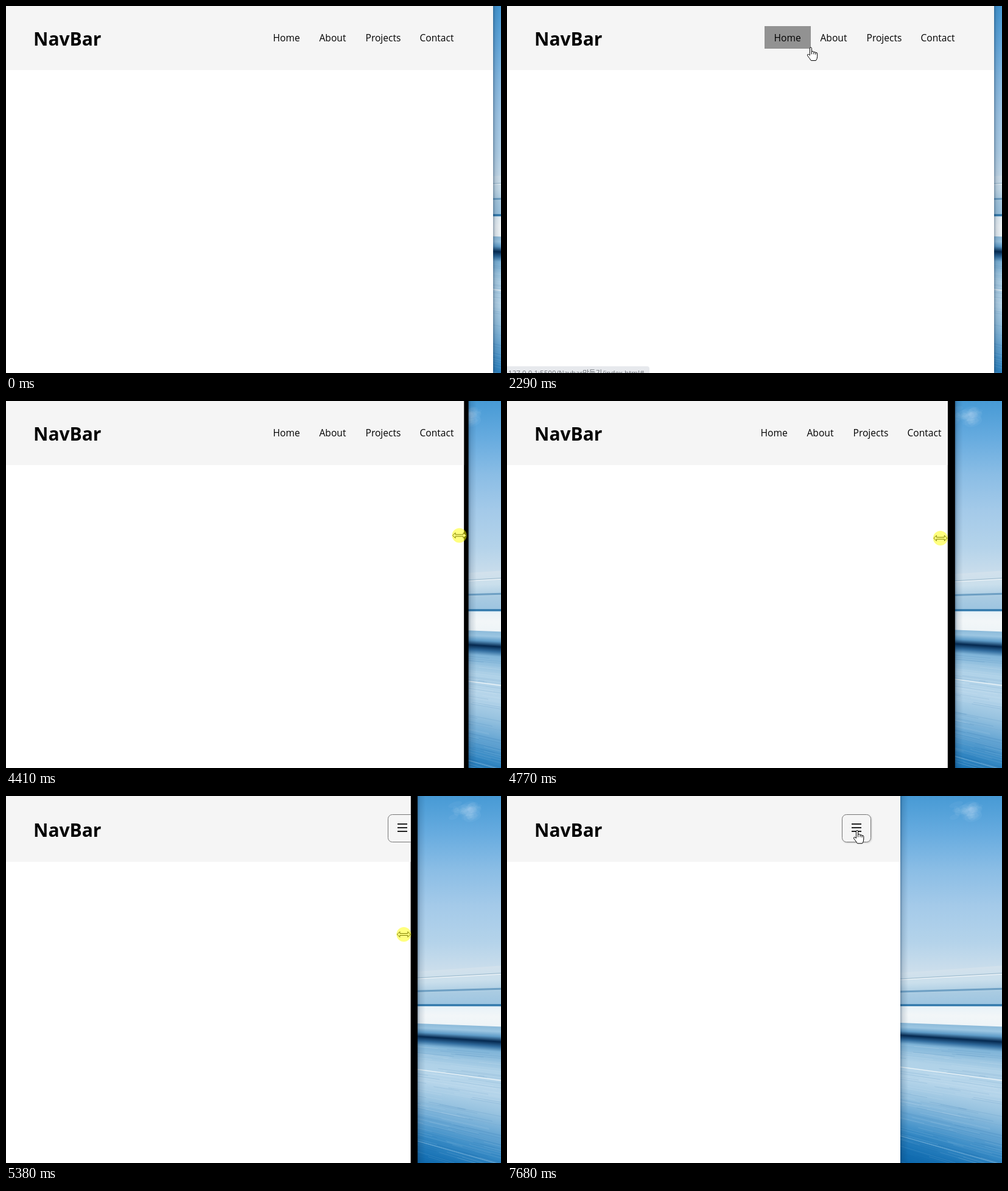
These frames come from a looping animation (813x602 px, 8 s). An HTML page with a canvas:

```html
<!DOCTYPE html>
<html lang="en">
<head>
<meta charset="utf-8">
<title>NavBar</title>
<style>
  html, body { margin: 0; width: 100%; height: 100%; overflow: hidden; background: #fff; }
  canvas, svg { position: absolute; left: 0; top: 0; display: block; }
  text { font-family: "Open Sans", "Noto Sans", "Noto Sans CJK KR", sans-serif; }
</style>
</head>
<body>
<canvas id="desk" width="813" height="602"></canvas>
<svg width="813" height="602" viewBox="0 0 813 602">
  <defs>
    <linearGradient id="shade">
      <stop offset="0" stop-color="#0a2a4a" stop-opacity=".4"/>
      <stop offset=".3" stop-color="#0a2a4a" stop-opacity=".14"/>
      <stop offset="1" stop-color="#0a2a4a" stop-opacity="0"/>
    </linearGradient>
    <clipPath id="clip"><rect id="view" height="602"/></clipPath>
    <filter id="drop" x="-20%" y="-20%" width="150%" height="150%">
      <feDropShadow dx="1" dy="1" stdDeviation="1" flood-opacity=".2"/>
    </filter>
  </defs>
  <rect id="shadow" width="13" height="602" fill="url(#shade)"/>
  <rect id="frame" height="602"/>
  <g clip-path="url(#clip)">
    <rect width="813" height="602" fill="#fff"/>
    <rect id="header" width="813" fill="#f5f5f5"/>
    <text id="logo" x="45" font-size="30" font-weight="700">NavBar</text>
    <g id="nav" font-size="15.6"></g>
    <g id="menu">
      <rect id="button" x=".5" y="30.5" width="47" height="45" rx="7" fill="#f5f5f5" stroke="#777"/>
      <path d="M16 46h16M16 52h16M16 58h16" stroke="#222" stroke-width="1.8"/>
    </g>
    <g id="status">
      <path d="M0 591H230Q234 591 234 595V602H0Z" fill="#e7e9ed"/>
      <text x="2" y="606" font-size="11.6" fill="#6b6f75">127.0.0.1:5500/Navbar만들기/index.html#</text>
    </g>
  </g>
  <g id="cursor" fill="#fff" stroke="#000" stroke-linejoin="round">
    <path id="arrow" d="M.5 .5V16L4 12.7 6.5 18.5 9 17.4 6.6 11.8H11.5Z"/>
    <path id="hand" d="M-1.5 13V1.8Q-1.5 .3 0 .3T1.5 1.8V7Q4.5 5.5 5 8 8 7 8 9 10.8 8 10.8 10.5V15Q10.8 19 8.5 21.8H.5Q-2 18 -5.2 14 -6.2 11.5 -4.3 11.5 -3 11.5 -1.5 13.5M1.5 7V11.5M5 8V11.5M8 9V12"/>
    <path id="resize" d="M-11 0L-6.5-4.5V-1.5H6.5V-4.5L11 0 6.5 4.5V1.5H-6.5V4.5Z"/>
    <circle id="press" r="12" fill="#ff0" fill-opacity=".5" stroke="none"/>
  </g>
</svg>
<script>
const $ = id => document.getElementById(id);
const set = (id, attrs) => { for (const k in attrs) $(id).setAttribute(k, attrs[k]); };
const show = (id, on) => set(id, { visibility: on ? 'visible' : 'hidden' });

const LOOP = 8000, LEFT = 646, RIGHT = 813, BOTTOM = 602, HORIZON = 343;

// Cursor hot spot: time, x, y
const path = [
  [330, 797, 478], [1150, 730, 70.5], [1950, 520, 64], [2020, 496, 65], [2290, 498.5, 67.5],
  [3090, 801, 214], [3450, 801, 214], [3460, 800, 221], [3790, 800, 221], [3800, 800, 213],
  [4770, 712, 225], [5050, 660, 227], [5700, 647, 227], [6130, 647, 227],
  [6200, 666, 233], [6350, 678, 245], [6870, 574, 58], [7200, 574, 58],
  [7340, 562, 44], [7480, 573, 61], [7680, 575, 56]
];
// Window edge: time, x
const drag = [[3800, 800], [4770, 736], [5050, 707], [5700, LEFT]];

// Links sit side by side, each padded around its word
let next = 423;
const links = [['Home', 76], ['About', 76], ['Projects', 89], ['Contact', 88]]
  .map(([name, w]) => ({ name, w, x: (next += w) - w }));

function at(keys, t) {
  const i = keys.findIndex(k => k[0] > t);
  if (i === 0) return keys[0].slice(1);
  if (i < 0) return keys[keys.length - 1].slice(1);
  const a = keys[i - 1], b = keys[i], p = (t - a[0]) / (b[0] - a[0]);
  return a.slice(1).map((v, j) => v + (b[j + 1] - v) * p);
}
const ramp = (t, from, to) => Math.max(0, Math.min(1, (t - from) / (to - from)));

function paintDesk() {
  const c = $('desk').getContext('2d');
  let seed = 7;
  const rnd = () => (seed = seed * 16807 % 2147483647) / 2147483647;
  // Everything spreads from the horizon towards the right
  const fan = (y, x) => HORIZON + (y - HORIZON) * (1 + .22 * (x - LEFT) / (RIGHT - LEFT));
  const blend = (y0, y1, colors) => {
    const g = c.createLinearGradient(0, y0, 0, y1);
    colors.split(' ').forEach((col, i, all) => g.addColorStop(i / (all.length - 1), '#' + col));
    return g;
  };
  const layer = (y0, y1, colors) => {
    for (let x = LEFT; x < RIGHT; x++) {
      const top = fan(y0, x);
      c.fillStyle = blend(top, fan(y1, x), colors);
      c.fillRect(x, top, 1, BOTTOM - top);
    }
  };
  const streak = (y, color, width = 1, x0 = LEFT, x1 = RIGHT) => {
    c.strokeStyle = color;
    c.lineWidth = width;
    c.beginPath();
    c.moveTo(x0, fan(y, x0));
    c.lineTo(x1, fan(y, x1));
    c.stroke();
  };

  c.fillStyle = blend(0, 300, '479ad5 66abdf 8abde5 a4cae9 b4d3ea d2e1ec');
  c.fillRect(LEFT, 0, RIGHT - LEFT, 310);
  for (let i = 0; i < 30; i++) {
    c.fillStyle = 'rgba(215,235,250,.05)';
    c.beginPath();
    c.ellipse(735 + rnd() * 35, 14 + rnd() * 22, 5 + rnd() * 11, 3 + rnd() * 6, -.3, 0, 7);
    c.fill();
  }

  layer(290, 343, 'd2e1ec cadfec a9cbe2 9cc4e0');
  layer(345, 372, 'e8f2f8 f2f6f8 eef4f7');
  layer(372, 406, '8dbbda 9cc6e2 5f9cc8 04284f 2f6a9c 7fb4d8');
  layer(406, BOTTOM, '7fb4d8 b0d2e8 b6d5ea 98c3e0 6aa8d4 3a8cc6 1a74b6 0965aa');
  for (let i = 0; i < 160; i++) {
    const x = LEFT - 60 + rnd() * 200;
    const tone = rnd() < .5 ? '255,255,255' : '0,80,150';
    streak(408 + rnd() * 194, `rgba(${tone},.1)`, 1, x, x + 40 + rnd() * 100);
  }
  streak(300, '#9dbacd');
  streak(301.5, '#f0f5f8');
  streak(321, '#6d9fc3', 3);
  streak(HORIZON, '#2b74a8', 3);
  streak(444.5, '#e8f2f7', 1.5);
  streak(557.5, '#6aa8d4');
}

function draw(t) {
  const [x, y] = at(path, t), [edge] = at(drag, t);
  // While dragging, the page is repainted halfway between cursor and window edge
  const page = t > 3800 && t < 5700 ? Math.min(edge, (edge + x) / 2) : edge;
  const width = t < 4600 ? 800 : t < 4850 ? 778 : t < 5600 ? 723 : LEFT;
  const narrow = width < 768, resizing = t >= 3110 && t < 6130;

  set('shadow', { x: edge });
  set('frame', { width: edge });
  set('view', { width: page });
  set('header', { height: narrow ? 108 : 105 });
  set('logo', { y: narrow ? 67 : 65 });
  set('nav', { transform: `translate(${width - 800})` });
  set('menu', { transform: `translate(${width - 96})` });
  $('nav').style.display = narrow ? 'none' : '';
  $('menu').style.display = narrow ? '' : 'none';

  const inside = (left, w, top, h) =>
    !resizing && x >= left && x < left + w && y >= top && y < top + h;
  const hot = links.find(l => !narrow && inside(l.x, l.w, 33, 37));
  links.forEach(l => set('bg' + l.name, { fill: l === hot ? '#929292' : 'none' }));
  const onMenu = narrow && inside(width - 96, 48, 30, 46);
  set('button', { filter: onMenu ? 'url(#drop)' : 'none' });
  set('status', { opacity: ramp(t, 1250, 1350) - ramp(t, 2450, 2650) });

  const hand = hot || onMenu;
  set('cursor', { transform: `translate(${x} ${y})` });
  show('arrow', t >= 70 && !hand && !resizing);
  show('hand', hand);
  show('resize', resizing);
  show('press', t >= 3460 && t < 5950);
}

$('nav').innerHTML = links.map(({ name, x, w }) =>
  `<rect id="bg${name}" x="${x}" y="33" width="${w}" height="37"/>` +
  `<text x="${x + 15.5}" y="58">${name}</text>`).join('');
paintDesk();
const start = performance.now();
(function tick() {
  draw((performance.now() - start) % LOOP);
  requestAnimationFrame(tick);
})();
</script>
</body>
</html>
```
